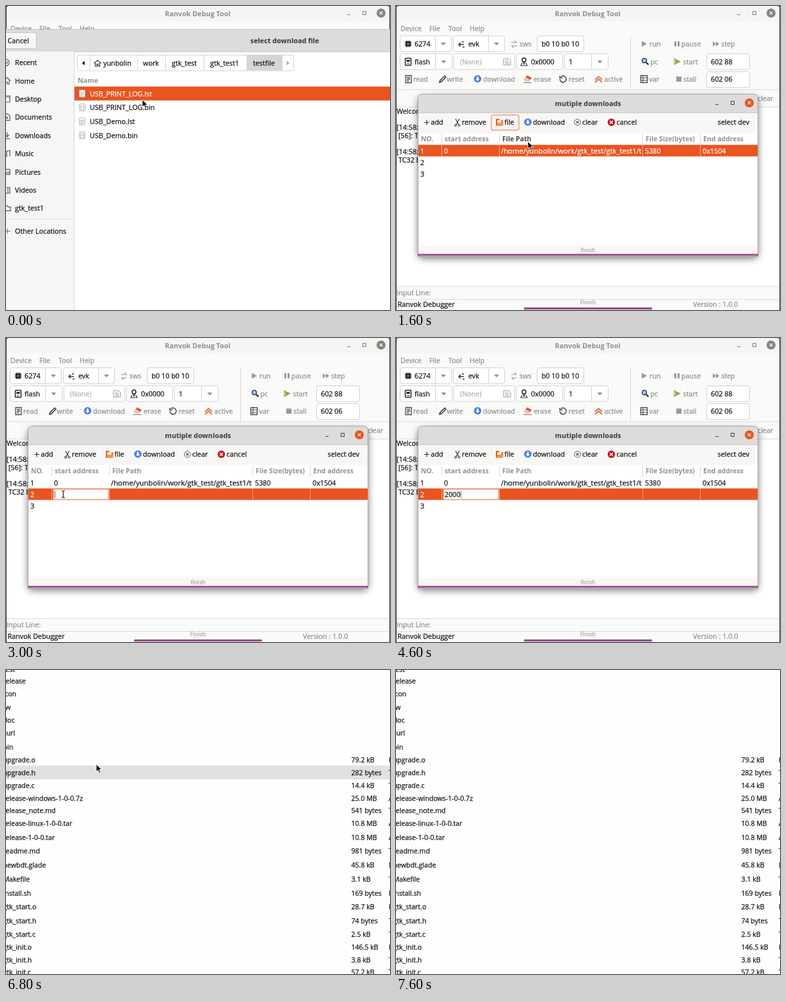
These frames come from a looping animation (600 by 474 pixels, 8 s). An HTML page:

```html
<!DOCTYPE html>
<html lang="en">
<head>
<meta charset="utf-8">
<title>Debug tool: multiple downloads</title>
<style>
  html, body { margin: 0; width: 100%; height: 100%; overflow: hidden; background: #fff; }
  svg { display: block; width: 600px; height: 474px; }
  text { font-family: "Open Sans", "Noto Sans", sans-serif; white-space: pre; fill: currentColor; }
  text[font-weight="400"] { stroke: currentColor; stroke-width: .25; }
</style>
</head>
<body>
<svg id="stage" viewBox="0 0 600 474"></svg>
<script>
const ORANGE = '#e95420', PURPLE = '#924d8b', INK = '#141414', GREY = '#8b8e8f', HEAD = '#92928f', BORDER = '#d3d1ce';
const LOOP = 8000, STEP = 200;

const text = (x, y, s, { color = INK, size = 10.8, bold, anchor = 'start', extra = '' } = {}) =>
  `<text x="${x}" y="${y}" color="${color}" font-size="${size}" font-weight="${bold ? 700 : 400}" text-anchor="${anchor}" ${extra}>${s}</text>`;
const rect = (x, y, w, h, fill, extra = '') =>
  `<rect x="${x}" y="${y}" width="${w}" height="${h}" fill="${fill}" ${extra}/>`;
const line = (d, stroke = BORDER, width = 1, extra = '') =>
  `<path d="${d}" fill="none" stroke="${stroke}" stroke-width="${width}" ${extra}/>`;
const fill = (d, color) => `<path d="${d}" fill="${color}"/>`;
const disc = (x, y, r, color, extra = '') => `<circle cx="${x}" cy="${y}" r="${r}" fill="${color}" ${extra}/>`;
const box = (x, y, w, h, color = '#fff', stroke = BORDER) =>
  rect(x + .5, y + .5, w - 1, h - 1, color, `stroke="${stroke}" rx="3"`);
const group = (id, body) => `<g id="${id}">${body}</g>`;
const cross = (x, y, r, color, w = 1.2) => line(`M${x - r} ${y - r}l${2 * r} ${2 * r}m0 ${-2 * r}l${-2 * r} ${2 * r}`, color, w);

function windowButtons(x, y, color, closeColor) {
  return line(`M${x - 53} ${y + 2.5}h5`, color) +
    rect(x - 28.5, y - 2.5, 5, 5, 'none', `stroke="${color}"`) +
    disc(x, y, 7, closeColor) + cross(x, y, 2.4, '#fff');
}

function mainTitle() {
  return rect(0, 0, 600, 474, '#fafaf8') + rect(0, 0, 600, 24, '#f6f5f3') +
    fill('M0 0h5Q0 0 0 5ZM600 0h-5Q600 0 600 5Z', '#2a1520') +
    text(299.5, 15.5, 'Ranvok Debug Tool', { bold: true, color: GREY, anchor: 'middle' }) +
    windowButtons(586, 11, '#7f7f7c', '#85847f') +
    [['Device', 7], ['File', 52], ['Tool', 82], ['Help', 115]]
      .map(([s, x]) => text(x, 39, s, { color: GREY })).join('');
}

const frameEdges = () => line('M.5 0V474M599.5 0V474', '#4a3f46');

// ---- File chooser ----
const FILES = ['USB_PRINT_LOG.lst', 'USB_PRINT_LOG.bin', 'USB_Demo.lst', 'USB_Demo.bin'];
const fileY = i => 125.6 + 21.7 * i;

function fileIcon(y, isText) {
  const marks = isText ? 'M116 135h6m-6 2.5h6m-6 2.5h4' : 'M116 134h2m2 0h2m-6 3h2m2 0h2m-6 3h2m2 0h2';
  return `<g transform="translate(0 ${y})">` +
    rect(114.5, 131, 9, 11, '#fcfcfb', 'stroke="#b9b8b5" rx="1"') + line(marks, '#aaa9a5', isText ? 1 : 1.6) + '</g>';
}

function sidebar() {
  const places = ['Recent', 'Home', 'Desktop', 'Documents', 'Downloads', 'Music', 'Pictures', 'Videos', 'gtk_test1'];
  const icons = [
    'M0-5a5 5 0 0 1 0 10M2-2v3h-3', 'M-2-1L2-5 7 0M5-1v6h-3v-3h-3', 'M0-5h6v10h-6M0-3h6', 'M0-5h3l3 3v7h-6M0 0h3m-3 2h3',
    'M2-5v6m-3-2l3 3 3-3M0 5h6', 'M1 4v-8l5-1v8M0 4h2m3-1h2', 'M0-4h6v8h-6M0 3l3-3 3 3', 'M0-4h6v9h-6M3-4v9', 'M0-4h2l1 2h4v6h-7'];
  return rect(0, 71, 106, 403, '#f7f6f4') + line('M106.5 71V474', '#d8d6d3') +
    places.map((s, i) => {
      const y = 88.2 + 28.4 * i;
      return `<g transform="translate(0 ${y})">${line(icons[i], '#555', 1.2)}</g>` + text(14, y + 4, s);
    }).join('') +
    line('M0 332.5H106', '#dddbd8') + line('M0 351h7M2.5 347v8', '#666') + text(14, 354.5, 'Other Locations');
}

function pathBar() {
  const parts = [['yunbolin', 152], ['work', 214], ['gtk_test', 259], ['gtk_test1', 319], ['testfile', 386]];
  return box(111, 76, 339, 25.5) + rect(376, 77, 55, 23.5, '#d6d5d3') +
    [131.5, 205.5, 249.5, 309.5, 376.5, 431.5].map(x => line(`M${x} 77v24`)).join('') +
    fill('M123 85.5v7l-4.5-3.5Z', '#222') + fill('M438.5 85.5v7l4.5-3.5Z', '#aaa') +
    line('M137.5 89.5l5.5-5 5.5 5M139.5 89v5h2.5v-3.5h2v3.5h2.5v-5', '#333', 1.2) +
    parts.map(([s, x]) => text(x, 92.8, s)).join('');
}

function chooser() {
  const rows = FILES.map((name, i) =>
    rect(107, fileY(i), 493, 21.7, 'none', `id="fileRow${i}"`) + fileIcon(21.7 * i, i % 2 === 0) +
    text(131, fileY(i) + 15, name, { extra: `id="fileName${i}"` })).join('');
  return mainTitle() + frameEdges() + rect(0, 36, 600, 438, '#fff') + rect(0, 37, 600, 34, '#dddcda') +
    line('M0 36.5H600', '#c4c2bf') + line('M0 71.5H600', '#cbc9c6') +
    box(-5, 41, 53, 26, '#f8f7f6', '#c6c3bf') + text(2.5, 57.5, 'Cancel') +
    text(435.5, 57.5, 'select download file', { bold: true, color: '#333', anchor: 'middle' }) +
    sidebar() + pathBar() + text(112, 119.5, 'Name', { bold: true, color: HEAD }) + rows;
}

// ---- Main window ----
const grey = (x, y, s) => text(x, y, s, { color: GREY });
const caret = (x, y) => fill(`M${x - 4} ${y - 2}h8l-4 4.5Z`, HEAD);
const combo = (x, y, w, split) => box(x, y, w, 25.5) + line(`M${split}.5 ${y + 1}v24`) + caret((split + x + w) / 2, y + 13);
const chip = (x, y) => rect(x - 4, y - 4, 8, 8, '#222', 'rx="1"') + rect(x - 1.5, y - 1.5, 3, 3, '#eee') +
  line(`M${x - 2.5} ${y - 5.5}v11m2.5-11v11m2.5-11v11M${x - 5.5} ${y - 2.5}h11m-11 2.5h11m-11 2.5h11`, '#222', .8);
const downIcon = (x, y) => disc(x, y, 5.8, '#4a7fdc') + fill(`M${x - 1.3} ${y - 3.5}h2.6v3.5h2l-3.3 3.7-3.3-3.7h2Z`, '#fff');
const magnifier = (x, y) => disc(x, y, 3.5, '#a8c8ef', 'stroke="#26364e" stroke-width="1.5"') + line(`M${x + 3} ${y + 3}l3.5 3.5`, '#222', 2.2);

function toolbar() {
  return combo(6, 46, 81, 61) + chip(19, 59) + text(29, 62.8, '6274') +
    combo(89, 46, 81, 144) + line('M98 60h8M101 57l-3 3 3 3M103 56h3m-2 8h3', '#333', 1.4) + text(113, 62.8, 'evk') +
    line('M180 57h8l-3-3m4 8h-8l3 3', '#999', 1.2) + grey(193, 62.8, 'sws') +
    box(220, 46, 74, 25.5) + text(227.5, 62.8, 'b0 10 b0 10') +
    combo(6, 74, 82, 61) + rect(14.5, 81.5, 9, 11, '#fff', 'stroke="#222" stroke-width="1.5" rx="1"') + rect(16.5, 84, 5, 3, '#222') + line('M17 90h4', '#222') + text(29, 90.8, 'flash') +
    box(90, 74, 96, 25.5) + text(100, 90.8, '(None)', { color: '#adb0b0' }) +
    line('M168 82h8l3 3v7h-11ZM170.5 85h4m-4 2.5h6m-6 2.5h6', '#999') +
    box(188, 74, 73, 25.5) + disc(200, 84, 3, '#fff', 'stroke="#222" stroke-width="1.5"') + line('M198 87l2 4 2-4M197 89l-2 4h10l-2-4', '#333', 1.2) + text(211, 90.8, '0x0000') +
    combo(263, 74, 69, 305) + text(270, 90.8, '1') +
    line('M15 108.5h9v11h-9ZM17 111.5h5m-5 2.5h5m-5 2.5h3', '#444', 1.3) + grey(27, 118, 'read') +
    line('M68 119l1-3 7-7 2 2-7 7Z', '#333', 1.5) + grey(79.5, 118, 'write') +
    downIcon(127.5, 113.5) + grey(136, 118, 'download') +
    fill('M200 114l5-6 7 4-5 6h-4Z', '#e7523e') + fill('M200 114l3-3 6 4-2 3h-4Z', '#f5c3ba') + line('M199 119.5h13', '#777') + grey(215, 118, 'erase') +
    line('M258 110a5 5 0 1 1-2 4M256 109v3h4', '#333', 1.4) + grey(269.5, 118, 'reset') +
    line('M311 115l5.5-5 5.5 5M311 119l5.5-5 5.5 5', '#d9713b', 1.8) + grey(325.5, 118, 'active') +
    line('M366.5 45V130', '#dad8d5') +
    fill('M384 54.5l8 4.5-8 4.5Z', '#999') + grey(396, 62.8, 'run') +
    rect(435, 55, 3, 8, '#999') + rect(440, 55, 3, 8, '#999') + grey(446, 62.8, 'pause') +
    fill('M495 55l5 4-5 4ZM500 55l5 4-5 4Z', '#999') + grey(508, 62.8, 'step') +
    magnifier(388, 85) + grey(397.5, 90.8, 'pc') +
    fill('M435 82l10 4.5-10 5 2-5Z', '#84ad31') + line('M435 81v11', '#8a8a45') + grey(448.5, 90.8, 'start') + box(485, 74, 68, 25.5) + text(492, 90.8, '602 88') +
    rect(382.5, 108.5, 10, 11, '#fff', 'stroke="#444" stroke-width="1.4"') + line('M382 112h11m-11 4h11m-7-7v10', '#444') + grey(395.5, 118, 'var') +
    rect(438, 110, 8, 8, '#999') + grey(449, 118, 'stall') + box(485, 102, 68, 25.5) + text(492, 118, '602 06') +
    line('M0 130.5H600', '#dedcd9') + grey(565, 148, 'clear');
}

function mainWindow() {
  const log = [['Welcom', 167.5], ['[14:58:', 193], [' [56]: T', 205.5], ['[14:58:', 230.5], [' TC32 E', 243.5]];
  return mainTitle() + toolbar() + rect(0, 157, 600, 280, '#fff') + line('M0 157.5H600M0 437.5H600M0 457.5H600', '#dedcd9') +
    log.map(([s, y]) => text(1, y, s)).join('') +
    grey(1, 451, 'Input Line:') + text(2.5, 468.8, 'Ranvok Debugger') +
    text(300, 465, 'Finish', { color: '#a4a6a5', size: 9, anchor: 'middle' }) + rect(200, 470, 200, 3.2, PURPLE, 'rx="1"') +
    grey(464, 468.5, 'Version : 1.0.0') + frameEdges();
}

// ---- Download dialog ----
const COLUMNS = [71.5, 161.5, 385.5, 475.5];
const rowY = i => 216.5 + 18 * i;

function dialogTools() {
  return rect(83.5, 170, 64, 24, '#fbfbfa', 'id="removeHover" stroke="#e3e1de" rx="3"') +
    rect(149, 170, 43, 23.5, '#f5f4f2', 'id="fileFocus" stroke="#ef9a7b" stroke-width="1.5" rx="3"') +
    line('M44 181.5h8M48 177.5v8', '#333', 1.2) + text(54.5, 185.3, 'add') +
    line('M93 176l5 9M99 176l-5 9', '#333', 1.2) + disc(93, 186, 1.5, 'none', 'stroke="#333"') + disc(98.5, 186, 1.5, 'none', 'stroke="#333"') + text(103, 185.3, 'remove') +
    fill('M156 176h5l1 2h5v9h-11Z', '#d95d27') + rect(158, 178, 7, 4, '#f8e5cf') + fill('M157 187l1-5h10l-1 5Z', '#f09548') + text(169.5, 185.3, 'file') +
    downIcon(206, 181) + text(214, 185.3, 'download') +
    disc(283.5, 181.3, 4.8, '#fff', 'stroke="#555"') + cross(283.5, 181.3, 2, '#444') + text(291, 185.3, 'clear') +
    disc(336.5, 181.3, 5.8, '#c41524') + cross(336.5, 181.3, 2.3, '#fff', 1.6) + text(344.5, 185.3, 'cancel') +
    text(502.5, 185.3, 'select dev');
}

function dialog() {
  const heads = [['NO.', 39], ['start address', 76], ['File Path', 166], ['File Size(bytes)', 390], ['End address', 480]];
  const cells = [['start', 75, '0'], ['size', 389, '5380'], ['end', 479, '0x1504']];
  return rect(34, 142, 532, 252, '#000', 'opacity=".5" rx="8" filter="url(#soft)"') +
    fill('M34 391V145q0-8 8-8H558q8 0 8 8V391Z', '#a9a7a4') +
    fill('M35 390V145q0-7 7-7H558q7 0 7 7V390Z', '#f8f7f5') +
    fill('M35 166V145q0-7 7-7H558q7 0 7 7V166Z', '#dddcda') + line('M35 166.5H565', '#c9c7c4') +
    text(300, 155.5, 'mutiple downloads', { bold: true, color: '#3a3a3a', anchor: 'middle' }) +
    windowButtons(552, 151, '#444', ORANGE) + dialogTools() +
    rect(35, 198, 530, 176, '#fff') +
    COLUMNS.map(x => line(`M${x} 199v17`, '#dddbd8')).join('') +
    heads.map(([s, x], i) => text(x, 211, s, { bold: true, color: HEAD, size: 10.5, extra: `id="head${i}"` })).join('') +
    group('selection', rect(35, 0, 530, 18, ORANGE) + COLUMNS.map(x => line(`M${x} 0v18`, '#f3a98c')).join('')) +
    [0, 1, 2].map(i => text(38, rowY(i) + 13.3, i + 1, { extra: `id="number${i}"` })).join('') +
    cells.map(([id, x, s]) => text(x, 229.8, s, { extra: `id="${id}"` })).join('') +
    text(164, 229.8, '/home/yunbolin/work/gtk_test/gtk_test1/testfile', { size: 11.3, extra: 'id="path" clip-path="url(#pathCell)"' }) +
    group('entry', rect(74.5, 236, 85.5, 15.5, '#fff', 'stroke="#f5b79f" stroke-width="1.5"') +
      text(76, 247.8, '', { extra: 'id="typed"' }) + line('M0 238.5v11', '#666', 1, 'id="insertion"')) +
    group('done', rect(74.5, 237.5, 25, 13, 'none', 'stroke="#f9d4c6"') + text(75.5, 247.8, '2000', { color: '#fff' })) +
    text(300, 384, 'finish', { color: '#a4a6a5', size: 9, anchor: 'middle' }) + rect(34, 386.5, 532, 3, PURPLE);
}

// ---- File manager: name, centre line, size, first part of the type ----
const LISTING = [
  ['test', -1], ['release', 17], ['icon', 37.5], ['fw', 58.5], ['doc', 78.5], ['curl', 98.5], ['bin', 120],
  ['upgrade.o', 140, '79.2 kB', 'P'], ['upgrade.h', 160, '282 bytes', 'T'], ['upgrade.c', 180, '14.4 kB', 'T'],
  ['release-windows-1-0-0.7z', 200, '25.0 MB', 'A'], ['release_note.md', 219, '541 bytes', 'T'],
  ['release-linux-1-0-0.tar', 239.5, '10.8 MB', 'A'], ['release-1-0-0.tar', 261, '10.8 MB', 'A'],
  ['readme.md', 282.5, '981 bytes', 'T'], ['newbdt.glade', 304, '45.8 kB', 'M'], ['Makefile', 326, '3.1 kB', 'T'],
  ['install.sh', 348, '169 bytes', 'P'], ['gtk_start.o', 369.5, '28.7 kB', 'P'], ['gtk_start.h', 391, '74 bytes', 'T'],
  ['gtk_start.c', 412.5, '2.5 kB', 'T'], ['gtk_init.o', 432.5, '146.5 kB', 'P'], ['gtk_init.h', 452.5, '3.8 kB', 'T'],
  ['gtk_init.c', 471.5, '57.2 kB', 'T']];

function manager() {
  const size = 10.6;
  return rect(0, 0, 600, 474, '#fefefd') + rect(0, 0, 600, 21.5, '#e1e1e0', 'id="managerHover"') +
    LISTING.map(([name, y, bytes, type]) => text(-4.5, y + 3.8, name, { size }) +
      (bytes ? text(539.5, y + 3.8, bytes, { size }) + text(598, y + 3.8, type, { size }) : '')).join('');
}

const stage = document.getElementById('stage');
stage.innerHTML = '<clipPath id="pathCell"><rect x="162" y="217" width="222" height="18"/></clipPath>' +
  '<filter id="soft"><feGaussianBlur stdDeviation="6"/></filter>' +
  group('chooser', chooser()) + group('tool', mainWindow() + dialog()) + group('manager', manager()) +
  group('ibeam', line('M87 238q2 0 2.5 1.5 .5-1.5 2.5-1.5M89.5 239v9M87 249q2 0 2.5-1.5 .5 1.5 2.5 1.5', '#222', 1.2)) +
  group('pointer', '<path d="M0 0V11.5L2.8 9 4.8 13.6 6.8 12.7 4.8 8.3H8.4Z" fill="#111" stroke="#fff" stroke-width=".8"/>');

const $ = id => document.getElementById(id);
const set = (id, attrs) => Object.entries(attrs).forEach(([k, v]) => $(id).setAttribute(k, v));
const show = (id, on) => set(id, { display: on ? 'inline' : 'none' });
const latest = (keys, t) => keys.filter(k => k[0] <= t).pop();

const POINTER = [
  [0, 213, 146], [200, 219, 151], [400, 226, 155], [1600, 206, 211], [1800, 172, 222], [2000, 134, 232],
  [2200, 104, 239], [2400, 89, 242], [5800, 107, 212], [6000, 121, 185], [6200, 127, 176], [6400, 133, 164],
  [6600, 138, 154], [6800, 141, 147], [7000, 152, 112], [7200, 166, 72], [7400, 182, 28], [7600, 200, -30]];
const TYPED = [[0, ''], [3800, '2'], [4200, '20'], [4400, '200'], [4600, '2000']];
const HOVERED = [[0, 160], [7000, 120], [7200, 78.5], [7400, 37.5], [7600, -40]];

function render(time) {
  const t = Math.floor(time % LOOP / STEP) * STEP;
  const between = (a, b) => t >= a && t < b;
  show('chooser', t < 1600);
  show('tool', between(1600, 6800));
  show('manager', t >= 6800);

  const file = t < 1000 ? 0 : 1;
  FILES.forEach((_, i) => {
    const hover = i === 1 && between(200, 1000);
    set('fileRow' + i, { fill: i === file ? ORANGE : hover ? '#efefee' : 'none' });
    set('fileName' + i, { color: i === file ? '#fff' : INK });
  });

  const row = t < 2600 ? 0 : 1;
  set('selection', { transform: `translate(0 ${rowY(row)})` });
  [0, 1, 2].forEach(i => set('number' + i, { color: i === row ? '#fff' : INK }));
  const cellInk = row === 0 ? '#fff' : INK, warned = t >= 5200 ? '#f01818' : cellInk;
  set('path', { color: cellInk });
  set('size', { color: cellInk });
  set('start', { color: warned });
  set('end', { color: warned });
  show('fileFocus', t < 2600);
  show('removeHover', between(6000, 6400));
  set('head2', { color: t === 1600 ? '#444' : HEAD });
  set('head1', { color: between(5800, 6200) ? '#80807d' : HEAD });

  show('entry', between(3000, 4800));
  show('done', t >= 4800);
  const typed = latest(TYPED, t)[1];
  $('typed').textContent = typed;
  set('insertion', { transform: `translate(${76.5 + typed.length * 6.2} 0)` });

  set('managerHover', { y: latest(HOVERED, t)[1] - 11 });
  const [, x, y] = latest(POINTER, t);
  set('pointer', { transform: `translate(${x} ${y})` });
  show('pointer', !between(3000, 5200));
  show('ibeam', between(3000, 3800));
}

const begin = performance.now();
function tick() {
  render(performance.now() - begin);
  requestAnimationFrame(tick);
}
tick();
</script>
</body>
</html>
```
